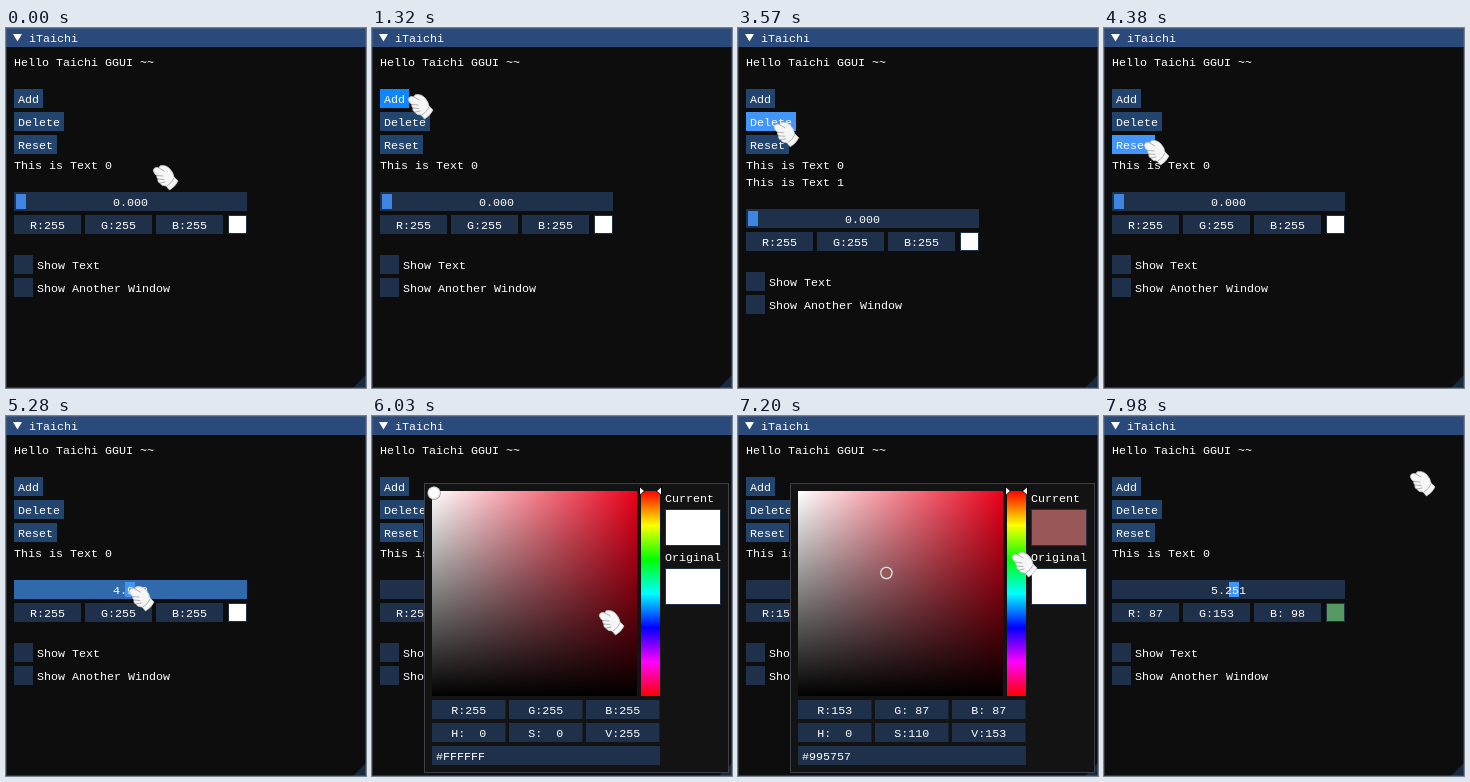
Animation of 360 by 360 pixels, one loop 8 s. Source, as an HTML page with a canvas:

```html
<!DOCTYPE html>
<html lang="en">
<head>
<meta charset="utf-8">
<style>
html, body { margin: 0; height: 100%; overflow: hidden; background: #0d0d0d; }
canvas { display: block; width: 360px; height: 360px; }
</style>
</head>
<body>
<canvas id="stage"></canvas>
<script>
const LOOP = 8000;
const canvas = document.getElementById('stage');
const dpr = window.devicePixelRatio || 1;
canvas.width = canvas.height = 360 * dpr;
const c = canvas.getContext('2d');

const FRAME = '#1e304a', FRAME_HOT = '#23456d', FRAME_ON = '#316aac';
const BUTTON = '#23456d', HOT = '#4296fa', ACTIVE = '#0f87fa', GRAB = '#3d85e0';

// Pointer path: time, x, y
const path = [
  [0, 148, 141], [240, 172, 150], [510, 172, 150], [1150, 37, 70],
  [2130, 37, 70], [2430, 34, 86], [3400, 34, 86], [3800, 41, 116],
  [4530, 41, 116], [4760, 15, 174], [4850, 15, 174], [5350, 130, 174],
  [5430, 130, 174], [5780, 228, 198], [6300, 228, 198], [6800, 148.4, 157],
  [6880, 148.4, 157], [7170, 275, 140], [7300, 275, 140], [7500, 276, 149],
  [7560, 276, 149], [7830, 307, 59], [LOOP, 307, 59]
];
const adds = [1400, 1650, 1900], deletes = [2580, 2980], reset = 4150;
const clicks = [...adds, ...deletes, reset];
const OPEN = 5880, CLOSE = 7850;

const clamp = (v, lo = 0, hi = 1) => Math.min(hi, Math.max(lo, v));

function pointer(t) {
  const i = Math.max(1, path.findIndex(p => p[0] >= t));
  const [t0, x0, y0] = path[i - 1], [t1, x1, y1] = path[i];
  const u = clamp((t - t0) / (t1 - t0)), e = u * u * (3 - 2 * u);
  return { x: x0 + (x1 - x0) * e, y: y0 + (y1 - y0) * e };
}

function hsv(h, s, v) {
  return [5, 3, 1].map(n => {
    const k = (n + h * 6) % 6;
    return Math.round(255 * v * (1 - s * clamp(Math.min(k, 4 - k))));
  });
}

const rgb = a => `rgb(${a})`;

function box(x, y, w, h, fill) {
  c.fillStyle = fill;
  c.fillRect(x, y, w, h);
}

function text(s, x, y, align = 'left') {
  c.fillStyle = '#fff';
  c.textAlign = align;
  c.fillText(s, x, y + 4);
}

function poly(fill, ...pts) {
  c.fillStyle = fill;
  c.beginPath();
  for (let i = 0; i < pts.length; i += 2) c.lineTo(pts[i], pts[i + 1]);
  c.fill();
}

function outline(x, y, w, h, color) {
  c.strokeStyle = color;
  c.lineWidth = 1;
  c.strokeRect(x + .5, y + .5, w - 1, h - 1);
}

function field(label, x, y, w) {
  box(x, y, w, 19, FRAME);
  text(label, x + w / 2, y + 10, 'center');
}

function fields(names, values, xs, y, w) {
  xs.forEach((x, i) => field(names[i] + ':' + String(values[i]).padStart(3), x, y, w));
}

function swatch(x, y, w, h, color) {
  box(x, y, w, h, color);
  outline(x, y, w, h, FRAME);
}

function gradient(x0, y0, x1, y1, colors) {
  const g = c.createLinearGradient(x0, y0, x1, y1);
  colors.forEach((col, i) => g.addColorStop(i / (colors.length - 1), col));
  return g;
}

const glove = new Path2D(`M-.5 2Q-1-1.5 3-1.5L5-1Q5-4 9-3.5Q13-3.5 16 0
  Q19 3 20 8L24 12Q21 18 15.5 21L12 17Q7 17 6 14Q3 13 4 10Q2 8 3 6.5Q0 5 -.5 2Z`);
const creases = new Path2D('M3 6.5L9 7M4 10L10 10.5M6 14L11 13M5-1L10 2M13 17Q18 14 20 9');

function hand(x, y) {
  c.save();
  c.translate(x, y);
  c.lineJoin = c.lineCap = 'round';
  c.fillStyle = '#f6f6f6';
  c.strokeStyle = '#c4c4c4';
  c.lineWidth = .8;
  c.fill(glove);
  c.stroke(glove);
  c.strokeStyle = '#a0a0a0';
  c.stroke(creases);
  c.restore();
}

function picker(h, s, v, color) {
  box(52, 67, 305, 290, '#131313');
  outline(52, 67, 305, 290, '#3f3f48');
  const [r, g, b] = hsv(h, 1, 1);
  const corner = rgb([r * .92, g, Math.max(b, r * .1)]);
  box(60, 75, 205, 205, gradient(60, 0, 265, 0, ['#fff', corner]));
  box(60, 75, 205, 205, gradient(0, 75, 0, 280, ['rgba(0,0,0,0)', '#000']));

  const hues = [0, 1, 2, 3, 4, 5, 6].map(i => rgb(hsv(i / 6, 1, 1)));
  box(269, 75, 19, 205, gradient(0, 75, 0, 280, hues));
  const y = 75 + h * 205;
  for (const [x, dir] of [[268, 1], [289, -1]]) {
    poly('#000', x - dir, y - 5, x + 5 * dir, y, x - dir, y + 5);
    poly('#fff', x, y - 3.5, x + 4 * dir, y, x, y + 3.5);
  }

  const px = clamp(60 + s * 205, 62, 263), py = clamp(75 + (1 - v) * 205, 77, 278);
  for (const [radius, fill] of [[6.7, '#808080'], [6.2, '#e4e4e4'], [5, color]]) {
    c.fillStyle = fill;
    c.beginPath();
    c.arc(px, py, radius, 0, 7);
    c.fill();
  }

  text('Current', 293, 82);
  swatch(293, 93, 56, 37, color);
  text('Original', 293, 141);
  swatch(293, 152, 56, 37, '#fff');

  const values = hsv(h, s, v), xs = [60, 137, 214];
  fields('RGB', values, xs, 284, 73.5);
  fields('HSV', [h, s, v].map(n => Math.round(n * 255)), xs, 307, 73.5);
  box(60, 330, 228, 19, FRAME);
  const hex = values.map(n => n.toString(16).padStart(2, '0')).join('');
  text('#' + hex.toUpperCase(), 64, 340);
}

function draw(t) {
  const m = pointer(t), open = t >= OPEN && t < CLOSE;
  const over = (x, y, w, h = 19) =>
    !open && m.x >= x && m.x < x + w && m.y >= y && m.y < y + h;
  const pressed = clicks.some(k => t >= k - 110 && t < k);
  const past = list => list.filter(k => t >= k).length;

  const extra = t >= reset ? 0 : past(adds) - past(deletes);
  const shift = extra * 17;
  const value = (pointer(clamp(t, 4850, 5350)).x - 15) / 21.9;

  let h = 0, s = 0, v = 1;
  if (t >= 6300) {
    const p = pointer(Math.min(t, 6800));
    s = (p.x - 60) / 205;
    v = 1 - (p.y - 75) / 205;
  }
  if (t >= 7300) h = (pointer(Math.min(t, 7500)).y - 75) / 205;
  const values = hsv(h, s, v), color = rgb(values);

  c.setTransform(dpr, 0, 0, dpr, 0, 0);
  c.font = '11.667px "Liberation Mono", monospace';
  box(0, 0, 360, 360, '#0d0d0d');
  box(0, 0, 360, 19, '#294a7a');
  poly('#fff', 7, 6, 16, 6, 11.5, 13.5);
  text('iTaichi', 23, 10);
  text('Hello Taichi GGUI ~~', 8, 34);

  [['Add', 29], ['Delete', 50], ['Reset', 43]].forEach(([label, w], i) => {
    const y = 61 + i * 23;
    const fill = over(8, y, w + 1) ? (pressed ? ACTIVE : HOT) : BUTTON;
    box(8, y, w, 19, fill);
    text(label, 12, y + 10);
  });
  for (let i = 0; i <= extra; i++) text('This is Text ' + i, 8, 137 + i * 17);

  c.save();
  c.translate(0, shift);
  const drag = t >= 4850 && t < 5390;
  box(8, 164, 233, 19, drag ? FRAME_ON : over(8, 164, 233) ? FRAME_HOT : FRAME);
  box(10 + value * 21.9, 166, 10, 15, drag || value > 0 ? HOT : GRAB);
  text(value.toFixed(3), 124.5, 174, 'center');
  fields('RGB', values, [8, 79, 150], 187, 67);
  swatch(222, 187, 19, 19, color);
  ['Show Text', 'Show Another Window'].forEach((label, i) => {
    box(8, 227 + i * 23, 19, 19, FRAME);
    text(label, 31, 237 + i * 23);
  });
  c.restore();

  poly('#182a40', 360, 347, 360, 360, 347, 360);
  outline(0, 0, 360, 360, 'rgba(110,110,128,.4)');
  if (open) picker(h, s, v, color);
  hand(m.x, m.y);
}

function tick() {
  draw(performance.now() % LOOP);
  requestAnimationFrame(tick);
}
tick();
</script>
</body>
</html>
```
